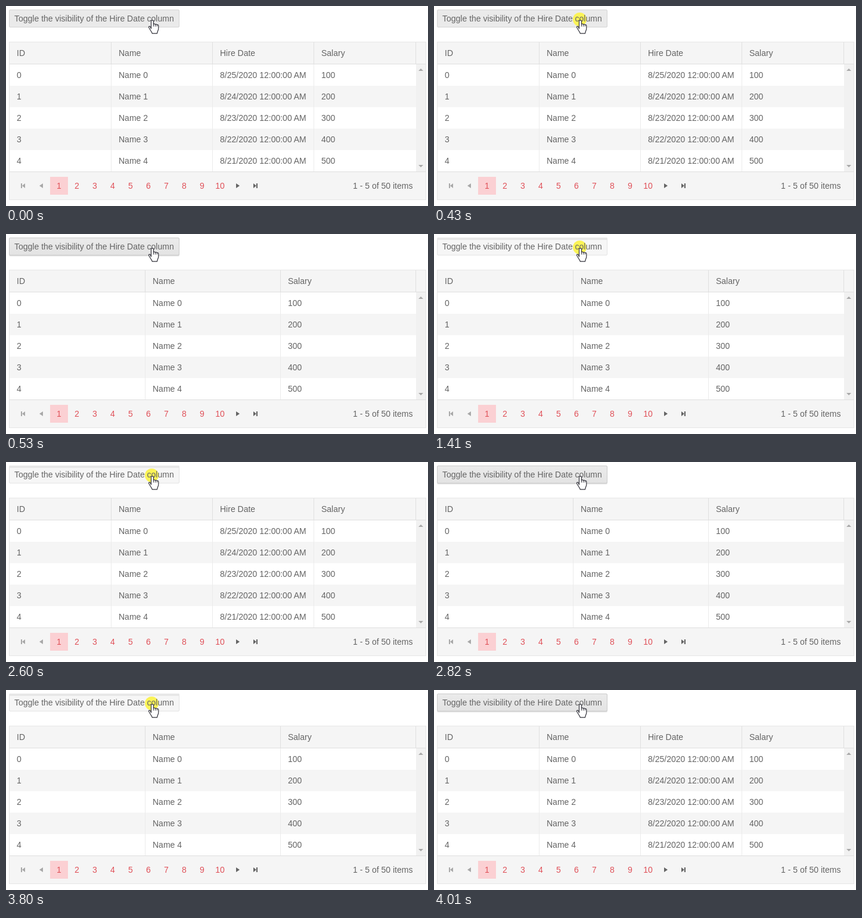
Animation of 708x336 px, one loop 4.56 s. Source, as an HTML page:

```html
<!DOCTYPE html>
<html lang="en">
<head>
<meta charset="utf-8">
<title>Column visibility</title>
<style>
  html, body { margin: 0; width: 100%; height: 100%; overflow: hidden; background: #fff; }
  svg { display: block; }
  text { font: 14px "Liberation Sans", Arial, sans-serif; fill: #656565; white-space: pre; }
  .link { fill: #e0525a; text-anchor: middle; }
  .muted { fill: #a8a8a8; }
  .icon { fill: #656565; }
</style>
</head>
<body>
<svg width="708" height="336" viewBox="0 0 708 336">
  <defs>
    <linearGradient id="hover" x1="0" y1="0" x2="0" y2="1">
      <stop stop-color="#ebebeb"/><stop offset="1" stop-color="#e3e3e3"/>
    </linearGradient>
  </defs>

  <g id="shadow" fill="#000">
    <rect x="5" y="7" width="286" height="30" rx="2" opacity=".08"/>
    <rect x="5" y="8" width="286" height="30" rx="2" opacity=".05"/>
  </g>
  <rect id="button" x="5.5" y="6.5" width="285" height="29" rx="1.5"/>
  <rect id="inset" x="5" y="6" width="286" height="4" rx="1.5" fill="#e7e7e7"/>
  <circle id="press" cx="244.5" cy="22.5" r="11.5" fill="#fbf357"/>
  <text x="14" y="26">Toggle the visibility of the Hire Date column</text>

  <g id="frame"></g>
  <g id="full"></g>
  <g id="reduced"></g>
  <g id="pager"></g>

  <path fill="#fff" stroke="#33333b" stroke-width="1.2" stroke-linejoin="round"
    d="M243.5 38V25.6c0-2.3 4-2.3 4 0V31c.3-1.5 2.8-1.3 2.9.3.4-1.2 2.6-.9 2.8.7.6-1 2.6-.5 2.6 1.2V38
       c0 2.500-1.300 3.500-1.600 5.500l-.7 2.700h-8.200c-.3-2.200-1.700-3.200-2.800-5.200l-2.800-4.800c-.8-1.700 1.200-2.800 2.400-1.300z"/>
  <path fill="none" stroke="#33333b" d="M247.500 30.500v4M250.400 31.500v3M253.200 32.500v2"/>
</svg>
<script>
const byId = id => document.getElementById(id);
const rect = (x, y, w, h, fill) => `<rect x="${x}" y="${y}" width="${w}" height="${h}" fill="${fill}"/>`;
const label = (x, y, value, kind = "") => `<text x="${x}" y="${y}" class="${kind}">${value}</text>`;
const icon = (d, kind = "icon") => `<path d="${d}" class="${kind}"/>`;

const rows = [0, 1, 2, 3, 4];
const rowTop = row => 98 + row * 36;
const columns = {
  id: ["ID", row => row],
  name: ["Name", row => `Name ${row}`],
  date: ["Hire Date", row => `8/${25 - row}/2020 12:00:00 AM`],
  salary: ["Salary", row => (row + 1) * 100]
};

// Each entry pairs a column with its left edge.
function drawColumns(layout) {
  return layout.map(([key, left]) => {
    const [title, value] = columns[key];
    const divider = left > 6 ? rect(left - 1, 61, 1, 36, "#dfdfdf") + rect(left - 1, 98, 1, 180, "#ebebeb") : "";
    return divider + label(left + 12, 84, title) +
      rows.map(row => label(left + 12, rowTop(row) + 23, value(row))).join("");
  }).join("");
}

byId("frame").innerHTML =
  rect(5, 60, 700, 266, "#e6e6e6") +
  rect(6, 61, 698, 36, "#f5f5f5") +
  rect(6, 97, 698, 1, "#dfdfdf") +
  rows.map(row => rect(6, rowTop(row), 682, 36, row % 2 ? "#f5f5f5" : "#fff")).join("") +
  rect(687, 61, 1, 36, "#dfdfdf") +
  rect(688, 98, 16, 180, "#f1f1f1") +
  rect(6, 278, 698, 1, "#dfdfdf") +
  rect(6, 279, 698, 46, "#f5f5f5") +
  icon("M692 109h8l-4-4zM692 267h8l-4 4z", "muted");

byId("full").innerHTML = drawColumns([["id", 6], ["name", 177], ["date", 347], ["salary", 517]]);
byId("reduced").innerHTML = drawColumns([["id", 6], ["name", 234], ["salary", 461]]);

byId("pager").innerHTML =
  rect(74, 287, 30, 30, "#fbd0d3") +
  Array.from({ length: 10 }, (_, i) => label(89 + i * 30, 307, i + 1, "link")).join("") +
  icon("M25 298h2v8h-2zM32 298v8l-5-4z", "muted") +
  icon("M62 298v8l-6-4z", "muted") +
  icon("M386 298v8l6-4z") +
  icon("M415 298v8l5-4zM420 298h2v8h-2z") +
  label(582, 307, "1 - 5 of 50 items");

const LOOP = 4560;
const within = (t, spans) => spans.some(([from, to]) => t >= from && t < to);
const show = (id, visible) => byId(id).setAttribute("visibility", visible ? "visible" : "hidden");

function draw(now) {
  const t = now % LOOP;
  const idle = t < 530;
  const active = within(t, [[1410, 1720], [2600, 2820], [3800, 4010]]);
  const dateHidden = within(t, [[530, 1720], [2820, 4010]]);

  show("full", !dateHidden);
  show("reduced", dateHidden);
  show("press", active || within(t, [[310, 530]]));
  show("inset", active);
  show("shadow", !idle && !active);
  byId("button").setAttribute("fill", active ? "#f6f6f6" : idle ? "#eaeaea" : "url(#hover)");
  byId("button").setAttribute("stroke", active ? "#e4e4e4" : idle ? "#d5d5d5" : "#cbcbcb");
}

const start = performance.now();
function tick() {
  draw(performance.now() - start);
  requestAnimationFrame(tick);
}
tick();
</script>
</body>
</html>
```
